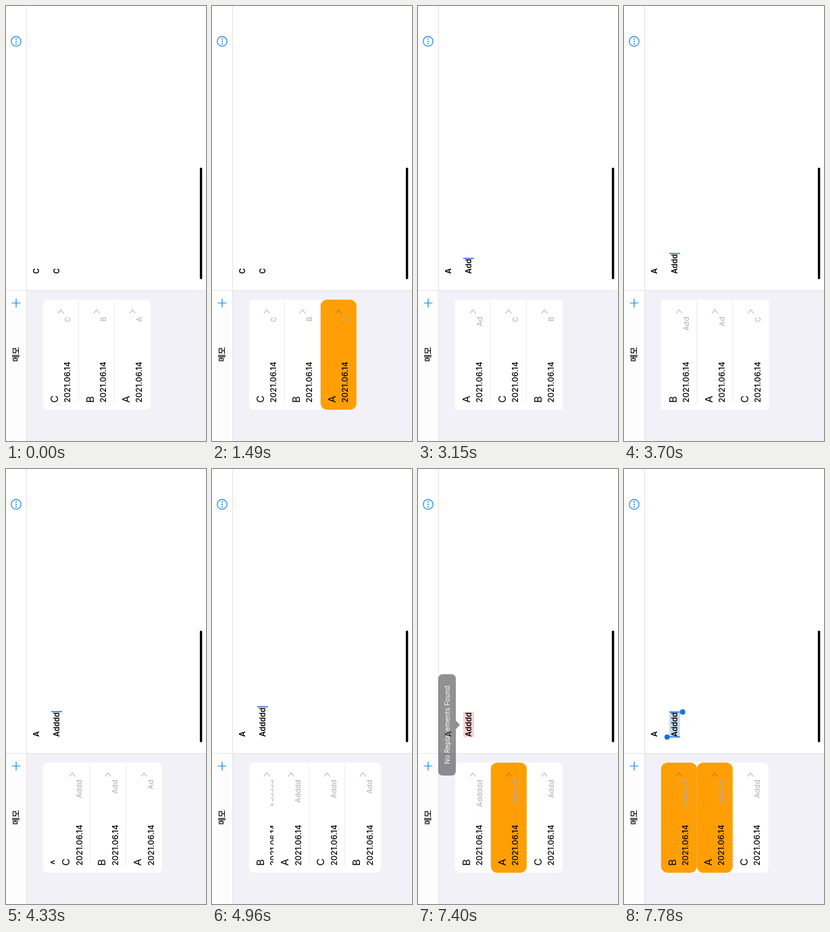
An HTML page for the animation above (8000 ms loop, 296x640 px).

```html
<!DOCTYPE html>
<html lang="ko">
<head>
<meta charset="utf-8">
<style>
html, body { margin: 0; width: 100%; height: 100%; overflow: hidden; background: #fff; }
svg { display: block; font-family: Inter, Roboto, sans-serif; }
.bar { font: 500 11.6px "Noto Sans CJK KR", "Noto Sans CJK", sans-serif; text-anchor: middle; stroke: #000; stroke-width: .25; }
.name { font-size: 14.9px; }
.date { font-size: 11.8px; font-weight: 500; }
.memo { font-size: 10.7px; fill: #adadad; text-anchor: end; }
.edit { font-size: 11.2px; font-weight: 600; }
.tip { font-size: 10px; fill: #fff; text-anchor: middle; }
.line { fill: none; stroke-linecap: round; stroke-linejoin: round; }
</style>
</head>
<body>
<svg width="296" height="640" viewBox="0 0 296 640">
  <!-- landscape screen, 640 x 296, turned a quarter left -->
  <g transform="matrix(0 -1 1 0 0 640)">
    <path fill="#f2f1f7" d="M0 30h222v266H0z"/>
    <path fill="#fdfdfd" d="M0 0h222v30H0z"/>
    <path stroke="#e4e4e7" d="M0 30.5h640M221.5 0v296"/>
    <text class="bar" x="127.5" y="19.2">메모</text>
    <g class="line" stroke="#0f80ee" stroke-width="1.2">
      <path d="M197 15h12M203 9v12"/>
      <circle cx="588" cy="15" r="7.2"/>
      <path stroke-width="2" d="M584.5 15h0M588 15h0M591.5 15h0"/>
    </g>
    <path class="line" stroke="#000" stroke-width="3.4" d="M239.7 288.6H400.5"/>
    <g id="list"></g>
    <g id="editor"></g>
  </g>
</svg>
<script>
const LOOP = 8000, LEFT = 46, TOP = 54.8, WIDTH = 162, ROW = 53, GROW = 300;
const BLUE = "#1a70e0";
// The screen refreshes only at these times
const ticks = [0, 1490, 2270, 2650, 2750, 2870, 3150, 3260, 3370, 3490, 3700, 3820, 3940,
  4210, 4320, 4440, 4730, 4850, 4960, 5070, 5280, 5390, 5630, 5730,
  6470, 6710, 6810, 7400, 7510, 7620, 7780];
// Each key press: time, and when its row starts to open
const keys = [[2650, 2655], [3150, 3232], [3700, 3682], [4210, 4206], [4730, 4773]];

const list = document.getElementById("list");
const editor = document.getElementById("editor");
const clamp = p => Math.max(0, Math.min(1, p));
const ease = p => p * p * (3 - 2 * p);
const rect = (x, y, w, h, fill, rx = 0) =>
  `<rect x="${x}" y="${y}" width="${w}" height="${h}" rx="${rx}" fill="${fill}"/>`;
const text = (cls, x, y, s) => `<text class="${cls}" x="${x}" y="${y}">${s}</text>`;
const nameOf = i => "ABC"[i % 3];
const memoOf = i => i < 3 ? nameOf(i) : "A" + "d".repeat(i - 2);
const endOf = s => 246 + 8 + 7.15 * (s.length - 1);

function row(i, y, selected) {
  return (selected ? rect(LEFT, y, WIDTH, ROW, "#ff9f05", 9) : "") +
    text("name", 56.3, y + 22.3, nameOf(i)) +
    text("date", 56.5, y + 40.6, "2021.06.14") +
    text("memo", 182.7, y + 40.2, memoOf(i)) +
    `<path class="line" stroke="#3c3c43" stroke-opacity=".36" stroke-width="1.2"
      d="M188 ${y + 22.4}l5 3.9l-5 3.9"/>`;
}

function drawList(t) {
  const typed = keys.filter(k => t >= k[0]).length;
  const opening = typed > 0 && t < 5280;
  const open = opening ? ROW * ease(clamp((t - keys[typed - 1][1]) / GROW)) : 0;
  const newest = 2 + typed - (opening ? 1 : 0);
  const isSelected = i => i === 0 ? t >= 1490 : i === 6 ? t >= 6470 : i === 7 && t >= 7780;
  let lines = "", rows = "";
  for (let n = 0; n < 3; n++) {
    const y = TOP + open + n * ROW;
    if (n) lines += `<path stroke="#e9e9eb" stroke-width=".8" d="M56 ${y - .5}H207"/>`;
    rows += row(newest - n, y, isSelected(newest - n));
  }
  if (open > 0) {
    rows += `<clipPath id="gap">${rect(0, TOP, 222, open, "#000")}</clipPath>
      <g clip-path="url(#gap)">${row(newest + 1, TOP, false)}</g>`;
  }
  const corner = opening && open < 2 ? 0 : 7;
  list.innerHTML = rect(LEFT, TOP, WIDTH, 3 * ROW + open, "#fff", corner) + lines + rows;
}

function callout(opacity) {
  return `<g opacity="${opacity}">
    ${rect(189, 30, 149, 26, "#262628", 6)}
    <path fill="#262628" d="M256.5 55.5h14l-7 6.5z"/>
    ${text("tip", 263.5, 46.6, "No Replacements Found")}</g>`;
}

function handles(end, r) {
  return `<path stroke="${BLUE}" stroke-width="1.5" d="M245.7 64V83M${end} 67V86"/>
    <g fill="${BLUE}"><circle cx="245.7" cy="63.8" r="${r}"/>
    <circle cx="${end}" cy="86.8" r="${r}"/></g>`;
}

function drawEditor(t) {
  const typed = keys.filter(k => t >= k[0]).length;
  const picked = t >= 6470;
  const body = t < 2270 ? "C" : picked ? memoOf(6) : "A" + "d".repeat(typed);
  const end = endOf(body);
  let out = "";
  if (picked) out += rect(245.5, 67, end - 245.5, 16, t < 7510 ? "#f9d2d4" : "#c9dcf0");
  out += text("edit", 246, 48.6, t < 2270 ? "C" : "A") + text("edit", 246, 79.1, body);
  if (t >= 2270 && !picked) {
    const fade = t < 5280 || t >= 5730 ? 1 : t >= 5390 && t < 5630 ? 0 : .5;
    out += `<g opacity="${fade}">${rect(end - .3, 67, 1.5, 16, "#3d66d6")}</g>`;
  }
  if (t >= 6710 && t < 7510) out += callout(t < 6810 || t >= 7400 ? .5 : 1);
  if (t >= 7620) out += handles(end, t < 7780 ? 3.4 : 3.9);
  editor.innerHTML = out;
}

let shown = -1;
function frame() {
  const now = performance.now() % LOOP;
  const t = ticks.filter(x => x <= now).pop();
  if (t !== shown) {
    shown = t;
    drawList(t);
    drawEditor(t);
  }
  requestAnimationFrame(frame);
}
frame();
</script>
</body>
</html>
```
